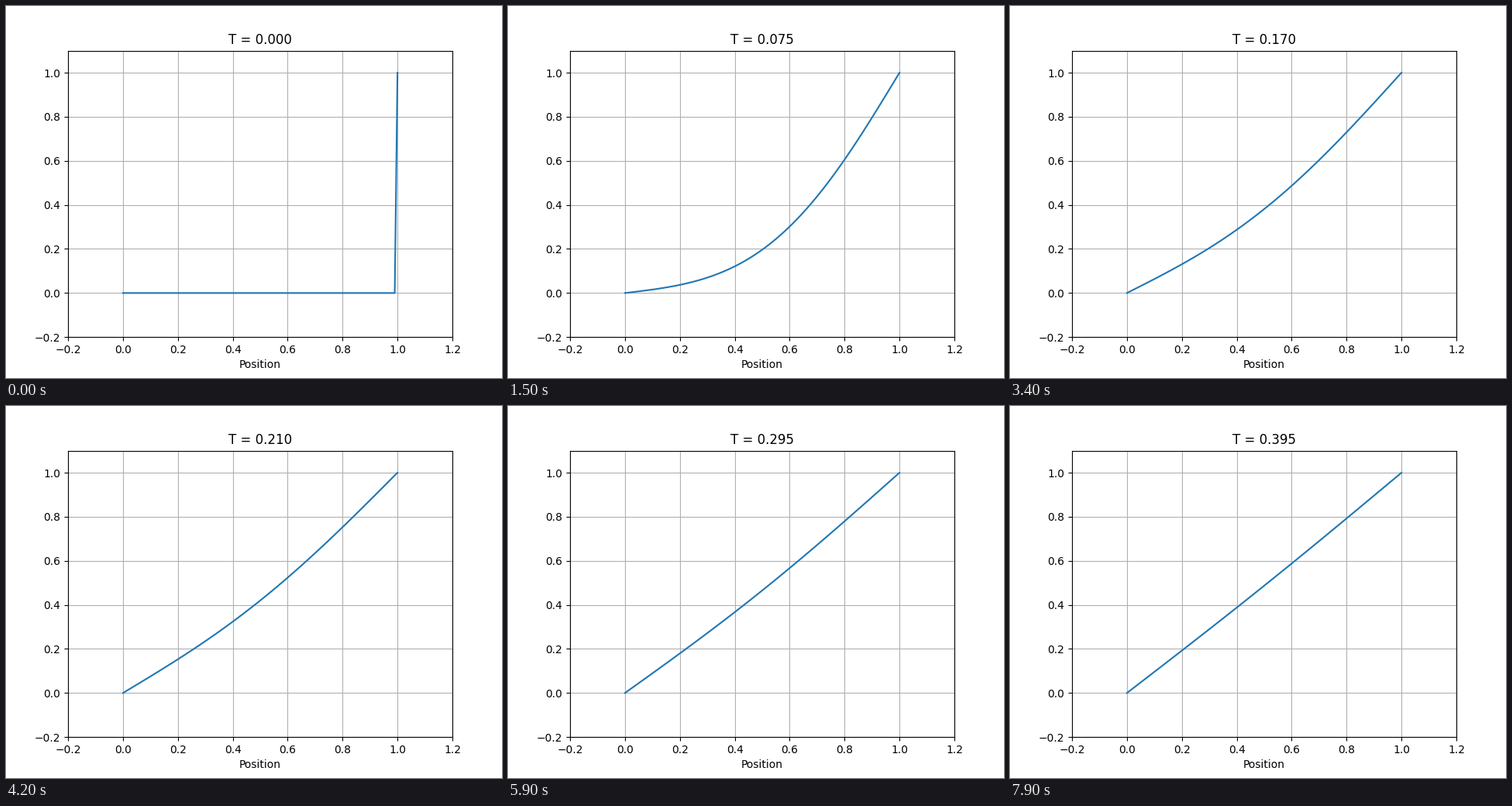
These frames come from a looping animation (640x480 px, 8000 ms). A matplotlib script:

```python
import numpy as np
import matplotlib.pyplot as plt
from matplotlib.animation import FuncAnimation

FRAMES, INTERVAL = 80, 100
DT = 0.005

x = np.linspace(0, 1, 101)
n = np.arange(1, 101)
modes = 2 * (-1.0) ** n / (n * np.pi) * np.sin(np.pi * np.outer(x, n))


def profile(t):
    """Heat diffusing from a wall held at 1 towards a wall held at 0."""
    u = np.zeros_like(x) if t == 0 else x + modes @ np.exp(-(n * np.pi) ** 2 * t)
    u[0], u[-1] = 0, 1
    return u


fig, ax = plt.subplots(figsize=(6.4, 4.8), dpi=100)
line, = ax.plot(x, profile(0))
title = ax.set_title("T = 0.000")
ax.set(xlim=(-0.2, 1.2), ylim=(-0.2, 1.1), xlabel="Position")
ax.grid(True)


def update(i):
    t = i * DT
    line.set_ydata(profile(t))
    title.set_text(f"T = {t:.3f}")
    return line, title


anim = FuncAnimation(fig, update, frames=FRAMES, interval=INTERVAL,
                     repeat=True, repeat_delay=0, blit=False)
plt.show()
```
